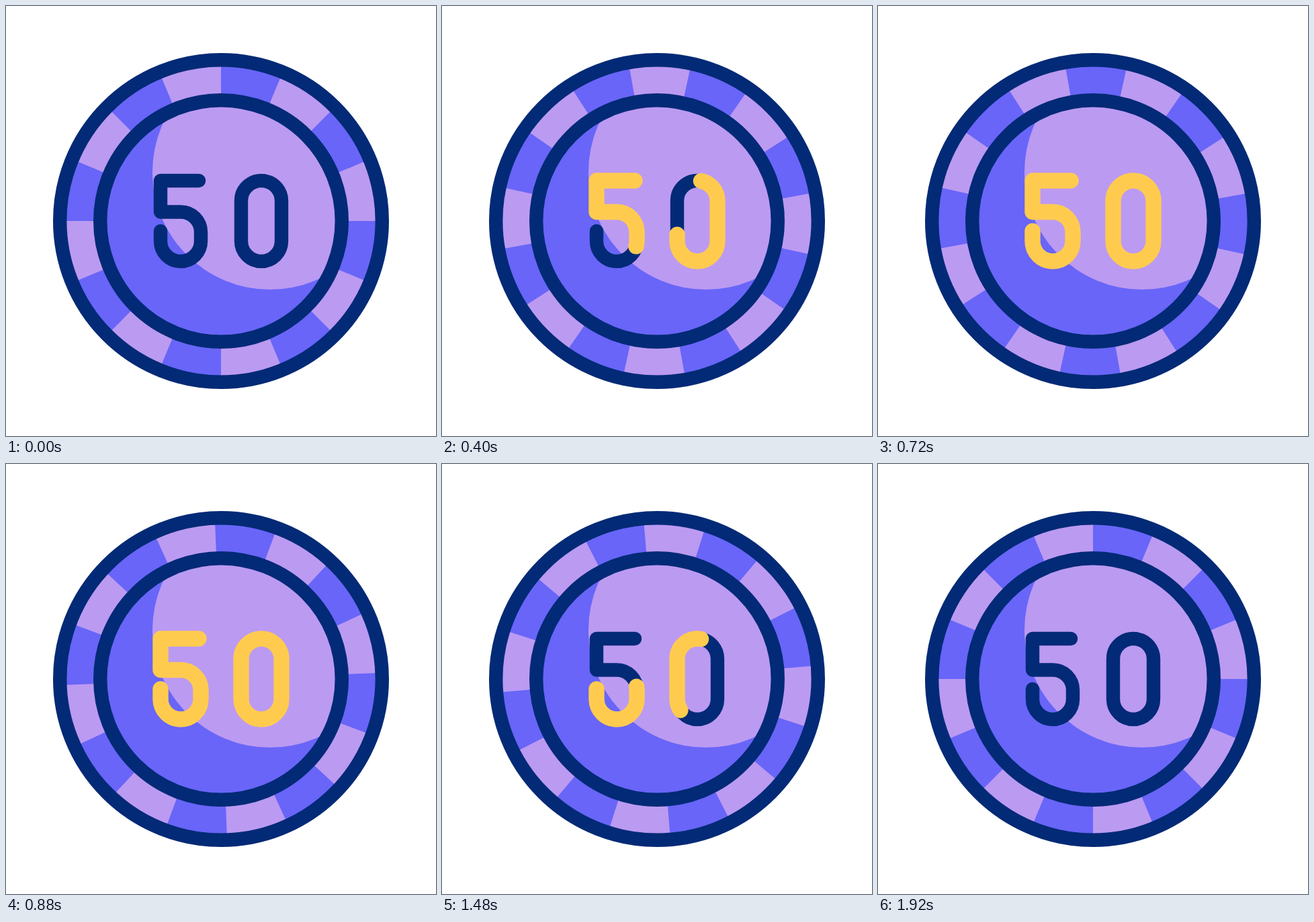
Write an HTML page that moves like this. It is 640 px wide and 640 px high and loops after 2000 ms.

```html
<!DOCTYPE html>
<html lang="en">
<head>
<meta charset="utf-8">
<title>Chip</title>
<style>
  html, body { margin: 0; width: 100%; height: 100%; overflow: hidden; background: #fff; }
  svg { display: block; width: 100vw; height: 100vh; }
  .line { fill: none; stroke: #032a76; stroke-width: 20.4; stroke-linecap: round; stroke-linejoin: round; }
  .glow { stroke: #ffcb4f; stroke-width: 23.4; }
</style>
</head>
<body>
<svg viewBox="0 0 640 640">
  <defs>
    <clipPath id="face"><circle cx="320" cy="320" r="175"/></clipPath>
    <path id="five" pathLength="1" d="M287 260H230V306.5H260A30 30 0 0 1 290 336.5V350a30 30 0 0 1-60 0V335"/>
    <path id="zero" pathLength="1" d="M385.5 260.5A30 30 0 0 1 410 290V350a30 30 0 0 1-60 0V290A30 30 0 0 1 385.5 260.5"/>
  </defs>
  <circle cx="320" cy="320" r="240" fill="#bb9af2"/>
  <circle id="rim" cx="320" cy="320" r="210" fill="none" stroke="#6865f8" stroke-width="50"
    pathLength="16" stroke-dasharray="1 1"/>
  <circle cx="320" cy="320" r="175" fill="#6865f8"/>
  <circle cx="393" cy="247" r="175" fill="#bb9af2" clip-path="url(#face)"/>
  <circle class="line" cx="320" cy="320" r="239.8"/>
  <circle class="line" cx="320" cy="320" r="179.8"/>
  <use href="#five" class="line"/>
  <use href="#zero" class="line"/>
  <g id="glow">
    <use href="#five" class="line glow"/>
    <use href="#zero" class="line glow"/>
  </g>
</svg>
<script>
  const LOOP = 2000, STEP = 40;
  const rim = document.getElementById('rim');
  const glow = document.getElementById('glow');

  // Cubic bezier (1/3, 0, x2, 1) between two times, from 0 to 1.
  function ease(t, from, to, x2 = 2 / 3) {
    const x = (t - from) / (to - from);
    if (x <= 0) return 0;
    if (x >= 1) return 1;
    let lo = 0, hi = 1;
    for (let i = 0; i < 24; i++) {
      const s = (lo + hi) / 2, r = 1 - s;
      if (s * r * r + 3 * x2 * s * s * r + s * s * s < x) lo = s;
      else hi = s;
    }
    return lo * lo * (3 - 2 * lo);
  }

  function draw(now) {
    const t = Math.floor(now % LOOP / STEP) * STEP;
    const turn = 45 * (ease(t, 85, 1002) - ease(t, 1000, 1918, 0.55));
    rim.setAttribute('transform', `rotate(${turn} 320 320)`);

    const end = ease(t, 82, 601);
    const start = ease(t, 1033, 1919, 0.55);
    glow.style.display = end > start ? '' : 'none';
    glow.style.strokeDasharray = `${end - start} 2`;
    glow.style.strokeDashoffset = -start;
    requestAnimationFrame(() => draw(performance.now()));
  }
  draw(performance.now());
</script>
</body>
</html>
```
